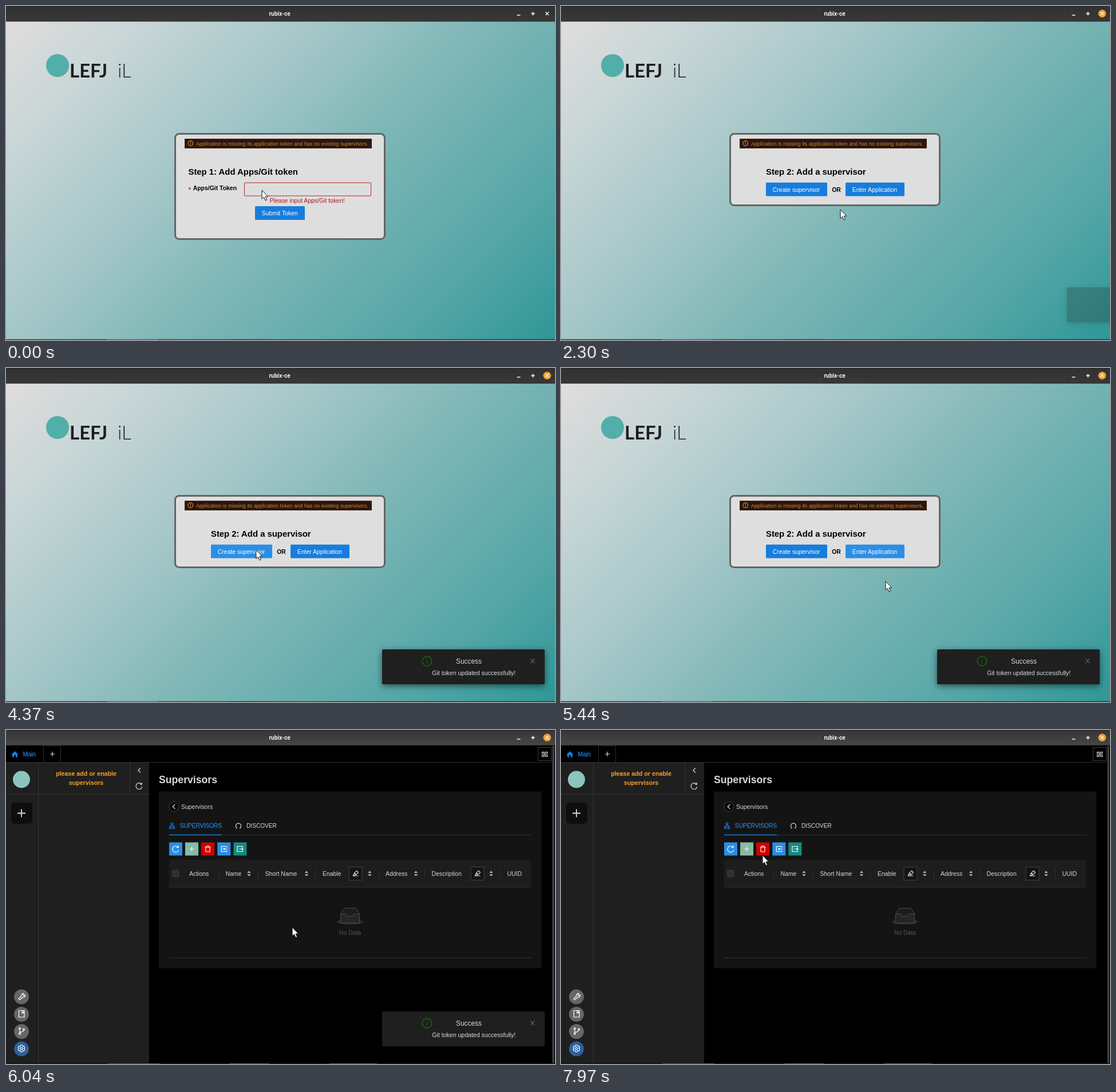
These frames come from a looping animation (959 by 584 pixels, 8000 ms). An HTML page:

```html
<!DOCTYPE html>
<html lang="en">
<head>
<meta charset="utf-8">
<title>rubix-ce</title>
<style>
html, body { margin: 0; width: 100%; height: 100%; overflow: hidden; background: #000; }
.stage { position: relative; width: 959px; height: 584px; overflow: hidden; }
.sky {
  position: absolute; inset: 27px 0 0;
  background: linear-gradient(135deg, #e0dddd, #c9d6d7 15%, #a5c7c9 36%, #80b7b7 55%, #55a6a7 82%, #2f9797);
}
svg { position: absolute; left: 0; top: 0; display: block; }
text { font: 10.45px "Liberation Sans", Arial, sans-serif; }
.b { font-weight: 700; }
.mid { text-anchor: middle; }
.h1 { font-size: 14.87px; }
.h2 { font-size: 17.65px; }
.caps { font-size: 10.15px; }
.small { font-size: 9.07px; }
.title { font: 700 10px Roboto, sans-serif; }
.brand { font: 700 33px Lato, sans-serif; }
.thin { font-weight: 300; }
.line { fill: none; stroke: currentColor; stroke-width: 1.2; }
.rule { fill: none; stroke: #303030; }
.toastbox { filter: drop-shadow(0 3px 6px #0008); }

/* One 8 s clock; hard changes by default. */
.a { animation: 8s step-end infinite; }
.light { animation-name: light; }
.dark { animation-name: dark; }
.step1 { animation-name: step1; }
.step2 { animation-name: step2; }
.panel { animation-name: panel; }
.focus { animation-name: focus; }
.error { animation-name: error; }
.token { animation-name: token; }
.field { animation-name: field; }
.glow { animation-name: glow; }
.dialog { animation-name: dialog; }
.drop { animation-name: drop; }
.submit { animation-name: submit; }
.create { animation-name: create; }
.enter { animation-name: enter; }
.mark { animation-name: mark; }
.toast { animation-name: toast; }
.cursor { animation-name: cursor; }

@keyframes light { 0% { opacity: 1 } 68.75%, 100% { opacity: 0 } }
@keyframes dark { 0% { opacity: 0 } 68.75%, 100% { opacity: 1 } }
@keyframes step1 { 0% { opacity: 1 } 26.3%, 100% { opacity: 0 } }
@keyframes step2 { 0% { opacity: 0 } 26.3%, 100% { opacity: 1 } }
@keyframes panel { 0% { opacity: 0 } 70.5%, 100% { opacity: 1 } }
@keyframes focus { 0% { opacity: 0 } 7.1%, 100% { opacity: 1 } }
@keyframes error {
  0% { opacity: 1 }
  15.6% { opacity: 1; animation-timing-function: steps(3) }
  18.6%, 100% { opacity: 0 }
}
@keyframes token { 0% { opacity: 0 } 14.6%, 100% { opacity: 1 } }
@keyframes field { 0% { stroke: #b3262b } 15.6%, 100% { stroke: #177ddc } }
@keyframes glow { 0% { opacity: 0 } 15.6%, 100% { opacity: .3 } }
@keyframes dialog {
  0% { height: 184px }
  15.6% { height: 184px; animation-timing-function: steps(3) }
  18.6% { height: 187.5px }
  26.3%, 100% { height: 125px }
}
@keyframes drop {
  0% { transform: none }
  15.6% { transform: none; animation-timing-function: steps(3) }
  18.6%, 100% { transform: translateY(3.6px) }
}
@keyframes submit { 0% { fill: #177ddc } 21.7% { fill: #2b8fe6 } 23.3% { fill: #095cb5 } 24.6%, 100% { fill: #2b8fe6 } }
@keyframes create { 0% { fill: #177ddc } 44% { fill: #2b8fe6 } 56%, 100% { fill: #177ddc } }
@keyframes enter { 0% { fill: #177ddc } 58.8% { fill: #2b8fe6 } 63.75% { fill: #095cb5 } 65.4%, 100% { fill: #2b8fe6 } }
@keyframes mark { 0% { opacity: 0 } 84.2% { opacity: 1 } 95.4%, 100% { opacity: 0 } }
@keyframes toast {
  0% { transform: translateX(302px); opacity: 0 }
  27.1% { transform: translateX(302px); opacity: 0; animation-timing-function: steps(4) }
  30.5% { transform: none; opacity: 1 }
  82.1% { transform: none; opacity: 1; animation-timing-function: steps(3) }
  84.6%, 100% { transform: none; opacity: 0 }
}
@keyframes cursor {
  0% { transform: translate(447px, 322px) }
  6.25% { transform: translate(447px, 322px); animation-timing-function: steps(6) }
  11.25% { transform: translate(452px, 320px) }
  15.6% { transform: translate(452px, 320px); animation-timing-function: steps(8) }
  23.7% { transform: translate(482px, 360px) }
  25.5% { transform: translate(482px, 360px); animation-timing-function: steps(9) }
  33% { transform: translate(500px, 348px) }
  38.1% { transform: translate(500px, 348px); animation-timing-function: steps(4) }
  41% { transform: translate(488px, 358px); animation-timing-function: steps(5) }
  45.5% { transform: translate(424px, 318px) }
  53% { transform: translate(424px, 318px); animation-timing-function: steps(10) }
  61.25% { transform: translate(552px, 319px) }
  63.75% { transform: translate(552px, 319px); animation-timing-function: steps(5) }
  67.95% { transform: translate(567px, 373px) }
  70.5% { transform: translate(567px, 373px); animation-timing-function: steps(6) }
  75.45% { transform: translate(500px, 345px); animation-timing-function: steps(6) }
  80.5% { transform: translate(56px, 79px); animation-timing-function: steps(4) }
  84% { transform: translate(33px, 74px); animation-timing-function: steps(4) }
  87.1% { transform: translate(27px, 86px) }
  93.8% { transform: translate(27px, 86px); animation-timing-function: steps(5) }
  98% { transform: translate(442px, 190px); animation-timing-function: steps(2) }
  99.6%, 100% { transform: translate(352px, 219px) }
}
</style>
</head>
<body>
<div class="stage">
<div class="sky"></div>
<svg width="959" height="584" viewBox="0 0 959 584">
  <defs>
    <linearGradient id="bar" x2="0" y2="1"><stop stop-color="#313131"/><stop offset="1" stop-color="#383838"/></linearGradient>
    <linearGradient id="barDark" x2="0" y2="1"><stop stop-color="#363636"/><stop offset="1" stop-color="#464646"/></linearGradient>
    <path id="sort" fill="#bfbfbf" d="M-3.3-1.3L0-4.6L3.3-1.3ZM-3.3 1.3L0 4.6L3.3 1.3Z"/>
    <path id="plus" class="line" d="M-4 0H4M0-4V4"/>
    <path id="back" class="line" d="M2-4L-2.2 0L2 4"/>
    <path id="reload" class="line" d="M4.3-3.2A5.4 5.4 0 1 0 5.3 1.2M4.7-6V-2.8H1.5"/>
    <g id="filter" color="#d9d9d9">
      <rect x="-11.5" y="-11.5" width="23" height="23" fill="#141414" stroke="#434343"/>
      <path class="line" d="M-5 4H5M-4 3.5L-2-1L2-5L5-2L1 2L-3 3.5M-2-1L1 2"/>
    </g>
  </defs>

  <g class="a light">
    <circle cx="90" cy="104" r="20" fill="#52aea8"/>
    <text class="brand" x="111" y="124.5" fill="#1d1d1f">LEFJ</text>
    <text class="brand thin" x="195" y="124.5" fill="#1d1d1f">iL</text>

    <rect class="a dialog" x="295.5" y="223.5" width="366" height="184" rx="7" fill="#dedede" stroke="#646464" stroke-width="3"/>
    <rect x="312.5" y="232.5" width="326" height="16" fill="#2b1611" stroke="#40230f"/>
    <g color="#d5891e">
      <circle class="line" cx="322.3" cy="240" r="4.3" stroke-width="1"/>
      <path class="line" d="M322.3 237.4V240.8M322.3 241.7V242.8"/>
      <text class="small" x="332" y="243.5" fill="currentColor">Application is missing its application token and has no existing supervisors.</text>
    </g>

    <g class="a step1">
      <text class="b h1" x="318.5" y="294.5">Step 1: Add Apps/Git token</text>
      <text x="318.8" y="324.5" fill="#b3262b" class="b">*</text>
      <text class="b" x="326.7" y="322">Apps/Git Token</text>
      <rect class="a glow" x="415.5" y="307.5" width="223" height="26" rx="2" fill="none" stroke="#177ddc" stroke-width="2"/>
      <rect class="a field" x="416.5" y="309" width="221" height="23" rx="1" fill="#dedede" stroke="#b3262b"/>
      <text class="a token" x="425" y="324.5" style="font-size:10.37px">ghp_H6wAoXiUxa6SmMlVhqAwjFSzxUaowi</text>
      <text class="a error" x="460.5" y="344.3" fill="#a61d24">Please input Apps/Git token!</text>
      <g class="a drop">
        <rect class="a submit" x="435" y="350" width="87" height="24" rx="1.5" fill="#177ddc"/>
        <text class="mid" x="478.3" y="366" fill="#fff">Submit Token</text>
      </g>
    </g>

    <g class="a step2">
      <text class="b h1" x="358" y="294.5">Step 2: Add a supervisor</text>
      <rect class="a create" x="358" y="308.7" width="107" height="23.8" rx="1.5" fill="#177ddc"/>
      <text class="mid" x="411" y="324.5" fill="#fff">Create supervisor</text>
      <text class="b mid" x="481" y="324.5">OR</text>
      <rect class="a enter" x="497" y="308.7" width="103" height="23.8" rx="1.5" fill="#177ddc"/>
      <text class="mid" x="548" y="324.5" fill="#fff">Enter Application</text>
    </g>
  </g>

  <g class="a dark" color="#d9d9d9" fill="#d9d9d9">
    <rect y="27" width="959" height="557" fill="#000"/>
    <path fill="#1f1f1f" d="M0 57H250V584H0Z"/>
    <path fill="none" stroke="#2c2c2c" d="M0 56.5H953M65.5 27V56M95.5 27V56M66 27.5H95"/>
    <path fill="none" stroke="#363636" d="M56.5 57V584M216.5 57V112M0 112.5H250"/>
    <path fill="#4a4a4a" d="M954.5 28H957.5V584H954.5Z"/>

    <g fill="#177ddc">
      <path d="M9.5 43L15.5 37L21.5 43H20V47.5H17V44H14V47.5H11V43Z"/>
      <text x="29.5" y="46" stroke="#177ddc" stroke-width=".3">Main</text>
    </g>
    <use href="#plus" x="81" y="42"/>
    <rect x="929.5" y="30.5" width="23" height="23" fill="#000" stroke="#3c3c3c"/>
    <path class="line" d="M936.5 38.5H939.8V41H936.5ZM942.2 38.5H945.8V41H942.2ZM936.5 43.5H939.8V46.5H936.5ZM942.2 43.5H945.8V46.5H942.2ZM939.8 42.2H942.2"/>

    <rect class="a mark" x="9.5" y="69.5" width="36" height="36" rx="6" fill="#333" stroke="#555"/>
    <circle cx="27" cy="86.5" r="15" fill="#8cc4c0"/>
    <g class="b mid" fill="#f8a126">
      <text class="b" x="140" y="80" style="font-size:10.7px">please add or enable</text>
      <text class="b" x="140" y="96" style="font-size:10.7px">supervisors</text>
    </g>
    <use href="#back" x="233" y="70.5"/>
    <use href="#reload" x="232.5" y="98"/>
    <rect x="9" y="127" width="37" height="37" rx="6" fill="#0e0e0e"/>
    <path class="line" stroke="#fff" style="stroke-width:1.8" d="M20 145.5H34M27 138.5V152.5"/>

    <g fill="#666">
      <circle cx="27" cy="466.5" r="13"/><circle cx="27" cy="497" r="13"/><circle cx="27" cy="527.2" r="13"/>
      <circle cx="27" cy="557.5" r="13" fill="#2c619b"/>
    </g>
    <g color="#fff">
      <path class="line" d="M22 470L27 465A3.8 3.8 0 0 1 31 460.5L29.5 463.5L31 465L33.5 463A3.8 3.8 0 0 1 29 467.5L24 472Z"/>
      <path class="line" d="M22.5 490.5H32V502H22.5ZM28 490.5V495L29.3 494L30.6 495V490.5"/>
      <g class="line"><circle cx="24" cy="522" r="1.4"/><circle cx="24" cy="531" r="1.4"/><circle cx="31" cy="523.5" r="1.4"/>
        <path d="M24 523.4V529.6M31 525Q31 528 24 528.5"/></g>
      <path class="line" d="M25.5 551H28.5L29.2 553L31.2 552.6L32.7 555.2L31.4 556.8L32.7 558.4L31.2 561L29.2 560.6L28.5 562.6H25.5L24.8 560.6L22.8 561L21.3 558.4L22.6 556.8L21.3 555.2L22.8 552.6L24.8 553Z"/>
      <circle class="line" cx="27" cy="556.8" r="2"/>
    </g>

    <g class="a panel">
      <text class="b h2" x="267" y="92.5">Supervisors</text>
      <rect x="267" y="107.5" width="668.5" height="309" rx="1" fill="#141414"/>
      <circle cx="293.3" cy="134" r="8.4" fill="#080808" stroke="#434343"/>
      <use href="#back" x="293.3" y="134"/>
      <text x="306" y="137.7">Supervisors</text>

      <path class="rule" d="M285 183.5H917M285 398.5H917"/>
      <g color="#177ddc" fill="#177ddc">
        <path class="line" d="M288.2 162.5H291.6V165.5H288.2ZM285.5 169.5H288.5V172.3H285.5ZM291.4 169.5H294.4V172.3H291.4ZM290 165.5V167.5M287 169.5V167.5H293V169.5"/>
        <text class="caps" x="304" y="171" stroke="#177ddc" stroke-width=".3">SUPERVISORS</text>
        <rect x="285" y="182.7" width="92" height="1.5"/>
      </g>
      <path class="line" d="M403.5 171.5A4.6 4.6 0 1 1 408.5 171.5M401.5 171.5H403.8M408.2 171.5H410.5"/>
      <text class="caps" x="420" y="171">DISCOVER</text>

      <rect x="285" y="196.5" width="23" height="23" fill="#2b8de3"/>
      <rect x="313" y="196.5" width="23" height="23" fill="#86bba7"/>
      <rect x="341" y="196.5" width="23" height="23" fill="#cf0000"/>
      <rect x="369.3" y="196.5" width="23" height="23" fill="#2b8de3"/>
      <rect x="397.4" y="196.5" width="23" height="23" fill="#168a81"/>
      <g color="#fff">
        <use href="#reload" x="296.3" y="208.3"/>
        <use href="#plus" x="324.5" y="208"/>
        <path class="line" d="M347.5 205H357.5M350.3 205V203H354.7V205M348.7 205L349.3 213H355.7L356.3 205"/>
        <path class="line" d="M385.7 205.5V203.5H376.3V212.5H385.7V210.5M386.5 208H380M382 206L380 208L382 210"/>
        <path class="line" d="M413.3 205.5V203.5H404V212.5H413.3V210.5M407.5 208H414M412 206L414 208L412 210"/>
      </g>

      <rect x="285" y="227" width="632" height="48" fill="#1d1d1d"/>
      <path class="rule" d="M285 274.8H917M371.5 243V259M440.5 243V259M540.5 243V259M651.5 243V259M731.5 243V259M863.5 243V259"/>
      <rect x="290.8" y="245.3" width="11" height="11" rx="1" fill="#303030" stroke="#434343"/>
      <text x="320" y="254.7">Actions</text>
      <text x="383.5" y="254.7">Name</text>
      <text x="452.5" y="254.7">Short Name</text>
      <text x="553" y="254.7">Enable</text>
      <text x="663" y="254.7">Address</text>
      <text x="743.5" y="254.7">Description</text>
      <text x="875.5" y="254.7">UUID</text>
      <use href="#sort" x="424.5" y="251"/><use href="#sort" x="525" y="251"/><use href="#sort" x="635.3" y="251"/>
      <use href="#sort" x="716" y="251"/><use href="#sort" x="847.5" y="251"/>
      <use href="#filter" x="610.5" y="251"/><use href="#filter" x="823.5" y="251"/>

      <ellipse cx="601" cy="335.5" rx="23" ry="5" fill="#292929"/>
      <path fill="#1c1c1c" stroke="#4c4c4c" d="M584.5 321.5L591 311.5H611L617.5 321.5V337.5H584.5Z"/>
      <path fill="#262626" stroke="#4c4c4c" d="M584.5 321.5H594Q594.5 325.5 597 325.5H605Q607.5 325.5 608 321.5H617.5V337.5H584.5Z"/>
      <text class="mid" x="601" y="358.2" fill="#555">No Data</text>
    </g>
  </g>

  <g class="a toast">
    <rect class="toastbox" x="657" y="492" width="284" height="61" rx="1.5" fill="#1f1f1f"/>
    <g color="#17690f">
      <circle class="line" cx="735.5" cy="512.6" r="8.3" style="stroke-width:1.6"/>
      <path class="line" d="M735.5 508V509.6M735.5 511V517"/>
    </g>
    <g fill="#d9d9d9">
      <text x="786" y="516.8" style="font-size:11.9px">Success</text>
      <text x="744.3" y="536.8" style="font-size:10.55px">Git token updated successfully!</text>
    </g>
    <path class="line" color="#858585" style="stroke-width:1" d="M916.3 508.3L923.5 516.3M923.5 508.3L916.3 516.3"/>
  </g>

  <rect width="959" height="27" fill="url(#bar)"/>
  <rect class="a dark" width="959" height="27" fill="url(#barDark)"/>
  <path fill="#222" d="M0 0H959V1H0ZM0 26.4H959V27.2H0Z"/>
  <text class="title mid" x="478" y="17" fill="#f2f2f2">rubix-ce</text>
  <circle class="a focus" cx="945.3" cy="13.3" r="6.8" fill="#f3a02f"/>
  <path class="line" color="#f2f2f2" style="stroke-width:1.6" d="M892.5 16H898.5M917.3 13.4H923.7M920.5 10.2V16.6M942.6 10.6L948 16M948 10.6L942.6 16"/>

  <path fill="#18303a" d="M0 582.7H959V584H0Z"/>
  <path fill="#5f6b55" d="M176 583H266V584H176Z"/>
  <path fill="#23406a" d="M268 583H390V584H268ZM460 583H565V584H460Z"/>
  <g class="a dark">
    <path fill="#17131f" d="M0 582.7H959V584H0Z"/>
    <path fill="#5a5a5a" d="M178 583H268V584H178ZM390 583H460V584H390ZM565 583H648V584H565Z"/>
  </g>

  <path class="a cursor" fill="#fff" stroke="#111" d="M0 0V15.3L3.5 12.2L6 18L8.6 16.9L6.1 11.2H10.7Z"/>
</svg>
</div>
</body>
</html>
```
